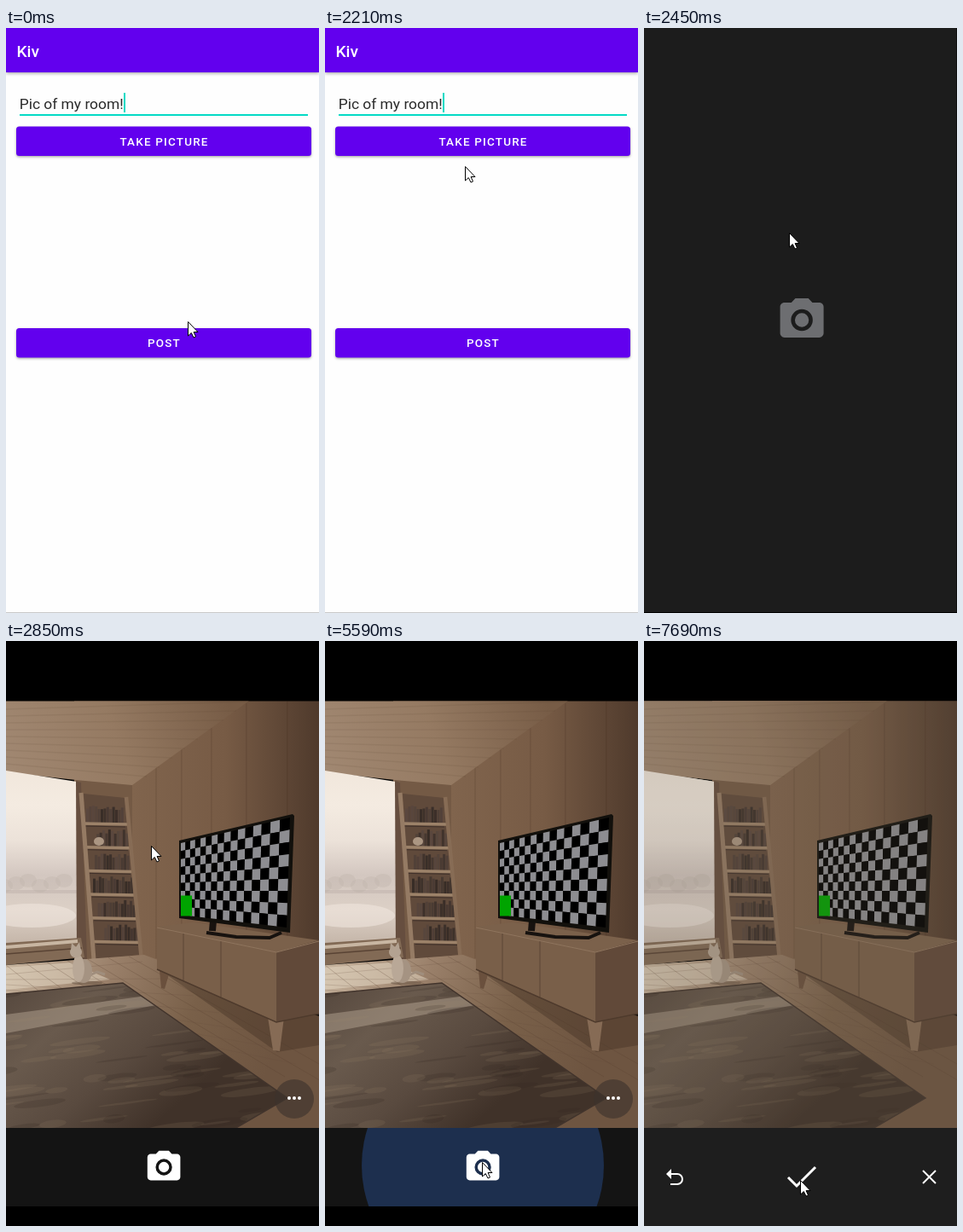
An HTML page with a canvas for the animation above (8000 ms loop, 367x686 px).

```html
<!DOCTYPE html>
<html lang="en">
<head>
<meta charset="utf-8">
<title>Photo post</title>
<style>
html, body { margin: 0; width: 100%; height: 100%; overflow: hidden; background: #000; }
canvas { display: block; width: 367px; height: 686px; }
</style>
</head>
<body>
<canvas id="stage"></canvas>
<script>
const W = 367, H = 686, LOOP = 8000;
const TICK = 127.7;
const SHUTTER = 5590, REVIEW = 5650;
const dpr = window.devicePixelRatio || 1;
const ctx = prepare(document.getElementById('stage'));
let g = ctx;

const CAMERA = new Path2D('M9 2 7.17 4H4c-1.1 0-2 .9-2 2v12c0 1.1.9 2 2 2h16c1.1 0 2-.9 2-2V6' +
  'c0-1.1-.9-2-2-2h-3.17L15 2zM12 17a5 5 0 1 1 0-10 5 5 0 0 1 0 10z' +
  'M12 8.8a3.2 3.2 0 1 0 0 6.4 3.2 3.2 0 0 0 0-6.4z');
const ARROW = new Path2D('M0 0V16.5L3.8 13 6.5 18.5 9 17.4 6.6 12H11.5z');

function prepare(c) {
  c.width = W * dpr;
  c.height = H * dpr;
  const context = c.getContext('2d');
  context.scale(dpr, dpr);
  return context;
}

const clamp = v => Math.max(0, Math.min(1, v));
const mix = (a, b, k) => a + (b - a) * k;
const during = (t, a, b) => clamp((t - a) / (b - a));
const smooth = k => k * k * (3 - 2 * k);
const held = t => Math.max(0, 12 + Math.floor((t - 12) / TICK) * TICK);

function pointerAt(t) {
  let x = 214, y = 344;
  const move = (from, to, x1, y1) => {
    const k = smooth(during(t, from, to));
    x = mix(x, x1, k);
    y = mix(y, y1, k);
  };
  move(130, 140, 216, 360);
  move(140, 520, 186, 241);
  move(700, 1030, 205, 338);
  move(1100, 1540, 170, 138);
  move(1950, 2170, 165, 162);
  move(2190, 2430, 171, 240);
  move(3250, 3710, 112, 368);
  move(3720, 4090, 212, 445);
  move(4110, 4860, 185, 611);
  move(6900, 7150, 211, 549);
  move(7170, 7420, 184, 611);
  move(7430, 7670, 184, 632);
  return [x, y];
}

function random(seed) {
  return () => (seed = (seed * 16807) % 2147483647) / 2147483647;
}

function rect(fill, x, y, w, h) {
  g.fillStyle = fill;
  g.fillRect(x, y, w, h);
}

function trace(p) {
  g.beginPath();
  for (let i = 0; i < p.length; i += 2) g.lineTo(p[i], p[i + 1]);
}

function poly(fill, ...p) {
  trace(p);
  g.closePath();
  g.fillStyle = fill;
  g.fill();
}

function line(color, width, ...p) {
  trace(p);
  g.strokeStyle = color;
  g.lineWidth = width;
  g.stroke();
}

function oval(fill, x, y, rx, ry = rx, turn = 0) {
  g.beginPath();
  g.ellipse(x, y, rx, ry, turn, 0, Math.PI * 2);
  g.fillStyle = fill;
  g.fill();
}

function ramp(x0, y0, x1, y1, ...colors) {
  const r = g.createLinearGradient(x0, y0, x1, y1);
  colors.forEach((c, i) => r.addColorStop(i / (colors.length - 1), c));
  return r;
}

function label(str, x, y, size, weight, color, spacing = 0) {
  g.font = `${weight} ${size}px Roboto, sans-serif`;
  g.letterSpacing = spacing + 'px';
  g.fillStyle = color;
  g.fillText(str, x, y);
}

function shadow(color, blur, dy) {
  g.shadowColor = color;
  g.shadowBlur = blur * dpr;
  g.shadowOffsetY = dy * dpr;
}

function cameraIcon(y, scale, color) {
  g.save();
  g.translate(185.1 - 12 * scale, y - 12 * scale);
  g.scale(scale, scale);
  g.fillStyle = color;
  g.fill(CAMERA, 'evenodd');
  g.restore();
}

// ---- room ----
function walls() {
  rect(ramp(148, 0, W, 0, '#80644d', '#775b45', '#4f3a2c'), 80, 70, 287, 320);
  for (let x = 176; x < W; x *= 1.17)
    line('rgba(50,33,22,.2)', 1, x, 168 - (x - 148) * .71, x, 372);
  rect('#745a45', 82, 160, 66, 216);
  poly(ramp(0, 160, 260, 70, '#a18872', '#957a62', '#775c46'),
    0, 70, 285, 70, 148, 169, 82, 163, 0, 154);
  for (let i = 0; i < 9; i++)
    line('rgba(80,58,42,.1)', 1.5, 0, 80 + i * 8, 285 - i * 15, 71 + i * 11);
}

function windowView() {
  poly(ramp(0, 152, 0, 356, '#f1e7dc', '#f4ebe1', '#ece2d9', '#d3c7c0', '#dcd0c6', '#c4b5a8'),
    0, 152, 83, 165, 83, 352, 0, 357);
  for (let i = 0; i < 6; i++) oval('rgba(190,178,170,.35)', i * 14 - 2, 287 - i % 3 * 3, 10, 8);
  rect('rgba(180,167,160,.35)', 0, 292, 83, 4);
  oval('rgba(240,230,222,.6)', 30, 322, 52, 14);
  poly('#664e3f', 82, 164, 88, 166, 95, 374, 83, 372);
  poly('#826a55', 0, 354, 88, 348, 92, 371, 0, 380);
  line('#c8b6a2', 4, 0, 359, 84, 352);
  line('#594334', 1.5, 0, 367, 89, 360);
}

function shelves() {
  const rnd = random(41);
  poly('#604a3b', 91, 179, 140, 184, 158, 368, 103, 373);
  for (let row = 0; row < 6; row++) {
    const y = 215 + row * 27.7, left = 89 + row * 2.5, right = 142 + row * 3;
    for (let x = left + 5 + rnd() * 12; x < right - 4; x += 3.4) {
      const h = 15 + rnd() * 6;
      rect(`hsl(20 18% ${18 + rnd() * 12}%)`, x, y - h - 1, 3, h);
    }
    line('#9c8269', 3.5, left, y - 1, right, y);
    line('#40312a', 1, left + 4, y + 2, right - 2, y + 3);
  }
  oval('#ab9682', 109, 235, 6, 5);
  line('#957b64', 5, 88, 178, 103, 374);
  line('#876c55', 4.5, 141, 183, 158.5, 370);
}

function flooring() {
  poly(ramp(0, 390, 300, 520, '#c6b39d', '#9a806a', '#796049', '#6e5541'),
    0, 380, 162, 368, 178, 374, 367, 440, 367, 572, 0, 572);
  poly('rgba(226,213,194,.55)', 0, 383, 76, 377, 122, 397, 0, 409);
  for (let i = 0; i < 7; i++) {
    line('rgba(84,63,47,.25)', 1, i * 24, 380 - i * 1.7, 95 + i * 58, 455 + i * 14);
    line('rgba(100,78,60,.2)', 1, 0, 391 + i * 6, 160 + i * 30, 376 + i * 20);
  }
  poly('rgba(58,40,30,.35)', 178, 384, 317, 446, 367, 437, 367, 474, 318, 482);
}

function rug() {
  const rnd = random(73);
  const shape = [0, 414, 137, 401, 330, 536, 268, 572, 0, 572];
  g.save();
  trace(shape);
  g.clip();
  rect(ramp(0, 400, 160, 580, '#55473d', '#695a4d', '#594a3f', '#403229'), 0, 395, 340, 180);
  poly('rgba(178,162,144,.5)', 0, 438, 158, 417, 176, 427, 0, 460);
  for (let i = 0; i < 70; i++) {
    const x = rnd() * 310 - 10, y = 405 + rnd() * 166;
    oval(rnd() < .5 ? 'rgba(45,34,28,.18)' : 'rgba(155,132,108,.14)',
      x, y, 12 + rnd() * 24, 1 + rnd() * 4, -.13);
  }
  g.restore();
  line('#42342c', 1.5, ...shape.slice(0, 8));
}

function cabinet() {
  poly('#6a503d', 180, 386, 191, 391, 186, 408, 182, 407);
  poly('#866b55', 307, 441, 326, 441, 321, 481, 313, 480);
  poly('#7b614b', 177, 335, 220, 330, 367, 351, 317, 365);
  poly('#795f49', 177, 335, 317, 365, 317, 447, 177, 385);
  poly('#614939', 317, 365, 367, 351, 367, 437, 317, 447);
  for (const x of [208, 252])
    line('#5d4736', 1, x, 342 + (x - 208) * .2, x, 399 + (x - 208) * .43);
  line('#8f755e', 1, 177, 336, 317, 365, 367, 352);
  line('#4e3a2c', 1.5, 177, 385, 317, 447, 367, 437);
}

// Perspective of the screen: its left side is further away
function screenPoint(u, v) {
  const k = 85 * u / mix(129, 85, u);
  return [mix(205, mix(333, 329, v), k), mix(mix(237, 207, k), mix(321, 336, k), v)];
}

function television() {
  line('#17120f', 8, 243, 328, 242, 340);
  line('#17120f', 4, 235, 342, 270, 347, 309, 348, 323, 342);
  poly('#12100c', 203, 234, 336, 203, 338, 205, 333, 342, 203, 325);
  const cols = 16, rows = 9;
  for (let c = 0; c < cols; c++)
    for (let r = 0; r < rows; r++) {
      const corner = (i, j) => screenPoint((c + i) / cols, (r + j) / rows);
      poly((c + r) % 2 ? '#000' : '#8d8d91',
        ...corner(0, 0), ...corner(1, 0), ...corner(1, 1), ...corner(0, 1));
    }
  rect('#00a400', 205, 298.5, 13, 24);
}

function cat() {
  line('#a08e7d', 3, 98, 392, 107, 388, 116, 391);
  oval('rgba(84,65,51,.4)', 95, 401, 18, 2.5);
  oval('#a59382', 91, 387, 10, 14);
  oval('#b9a897', 85, 384, 7, 16);
  oval('#b3a291', 82, 365, 7, 6.5);
  poly('#b3a291', 76, 363, 77, 354, 82, 359, 86, 353, 88, 363);
}

function buildRoom() {
  const c = document.createElement('canvas');
  g = prepare(c);
  g.beginPath();
  g.rect(0, 70.5, W, 501);
  g.clip();
  [walls, windowView, shelves, flooring, rug, cabinet, television, cat].forEach(f => f());
  g = ctx;
  return c;
}

// ---- screens ----
function buttonShape(y) {
  g.beginPath();
  g.roundRect(12, y, 346, 34.5, 3.5);
}

function button(y, caption, x) {
  g.save();
  shadow('rgba(0,0,0,.35)', 3, 1.2);
  buttonShape(y);
  g.fillStyle = '#6200ee';
  g.fill();
  g.restore();
  label(caption, x, y + 22, 13.45, 500, '#fff', 1.2);
}

function form(t) {
  rect('#fefefe', 0, 0, W, H);
  g.save();
  shadow('rgba(0,0,0,.4)', 4, 1);
  rect('#6200ee', 0, 0, W, 52);
  g.restore();
  label('Kiv', 12.5, 34, 19.2, 500, '#fff');
  label('Pic of my room!', 15.7, 95, 17.4, 400, '#2b2b2b');
  rect('#03dac5', 16, 101, 338, 2);
  const caretOn = t > 1550 || Math.floor((t + 370) / 500) % 2 === 0;
  if (caretOn) rect('#03dac5', 138, 76, 2, 23);
  button(115.5, 'TAKE PICTURE', 133.5);
  button(352, 'POST', 166);
  const press = during(t, 1660, 2180);
  if (press > 0) {
    g.save();
    buttonShape(115.5);
    g.clip();
    g.globalAlpha = .24 * clamp(2 - 2 * press);
    oval('#fff', 172, 138, 40 + press * 330);
    g.restore();
  }
  rect('#c9c9c9', 0, 685, W, 1);
}

function splash() {
  rect('#1c1c1c', 0, 0, W, H);
  rect('#0d0d0d', 366, 0, 1, H);
  rect('#000', 0, 685, W, 1);
  cameraIcon(342.5, 2.55, '#6d6e71');
}

function viewfinder(t) {
  rect('#000', 0, 0, W, H);
  g.drawImage(room, 0, 0, W, H);
  rect('#141414', 0, 571, W, 92);
  if (t >= SHUTTER) {
    g.save();
    g.beginPath();
    g.rect(0, 571, W, 92);
    g.clip();
    oval('#1d2f4e', 185, 615, 142 + Math.max(0, held(t) - SHUTTER) * .75);
    g.restore();
  }
  cameraIcon(617, 1.93, '#fff');
  oval('rgba(60,50,44,.62)', 338, 537, 23);
  for (let i = -1; i < 2; i++) oval('#fff', 338 + i * 6, 536, 2);
}

function review() {
  g.drawImage(room, 0, 0, W, H);
  rect('rgba(98,86,72,.2)', 0, 70.5, W, 501);
  rect('#1e1e1e', 0, 571, W, 115);
  g.beginPath();
  g.moveTo(28, 625);
  g.arc(39, 631, 6, -Math.PI / 2, Math.PI / 2);
  g.lineTo(31, 637);
  g.strokeStyle = '#fff';
  g.lineWidth = 2;
  g.stroke();
  poly('#fff', 26, 625, 32, 619, 32, 631);
  line('#fff', 3, 169, 629, 179, 639, 201, 617);
  line('#fff', 2, 327, 621, 342, 636);
  line('#fff', 2, 342, 621, 327, 636);
}

function faded(alpha, paint) {
  if (alpha <= 0) return;
  g.save();
  g.globalAlpha = alpha;
  paint();
  g.restore();
}

function pointer(t) {
  const [x, y] = pointerAt(t);
  g.save();
  g.translate(Math.round(x) - .5, Math.round(y) + .5);
  g.fillStyle = '#fff';
  g.strokeStyle = '#000';
  g.lineWidth = 1;
  g.fill(ARROW);
  g.stroke(ARROW);
  g.restore();
}

const room = buildRoom();

function draw(now) {
  const t = held(now);
  form(t);
  faded(during(t, 2200, 2430), splash);
  if (t > 2450) faded(during(t, 2450, 2820), () => viewfinder(now));
  faded(during(t, REVIEW, REVIEW + 300), review);
  pointer(t);
}

const start = performance.now();
function tick() {
  draw((performance.now() - start) % LOOP);
  requestAnimationFrame(tick);
}
tick();
</script>
</body>
</html>
```
